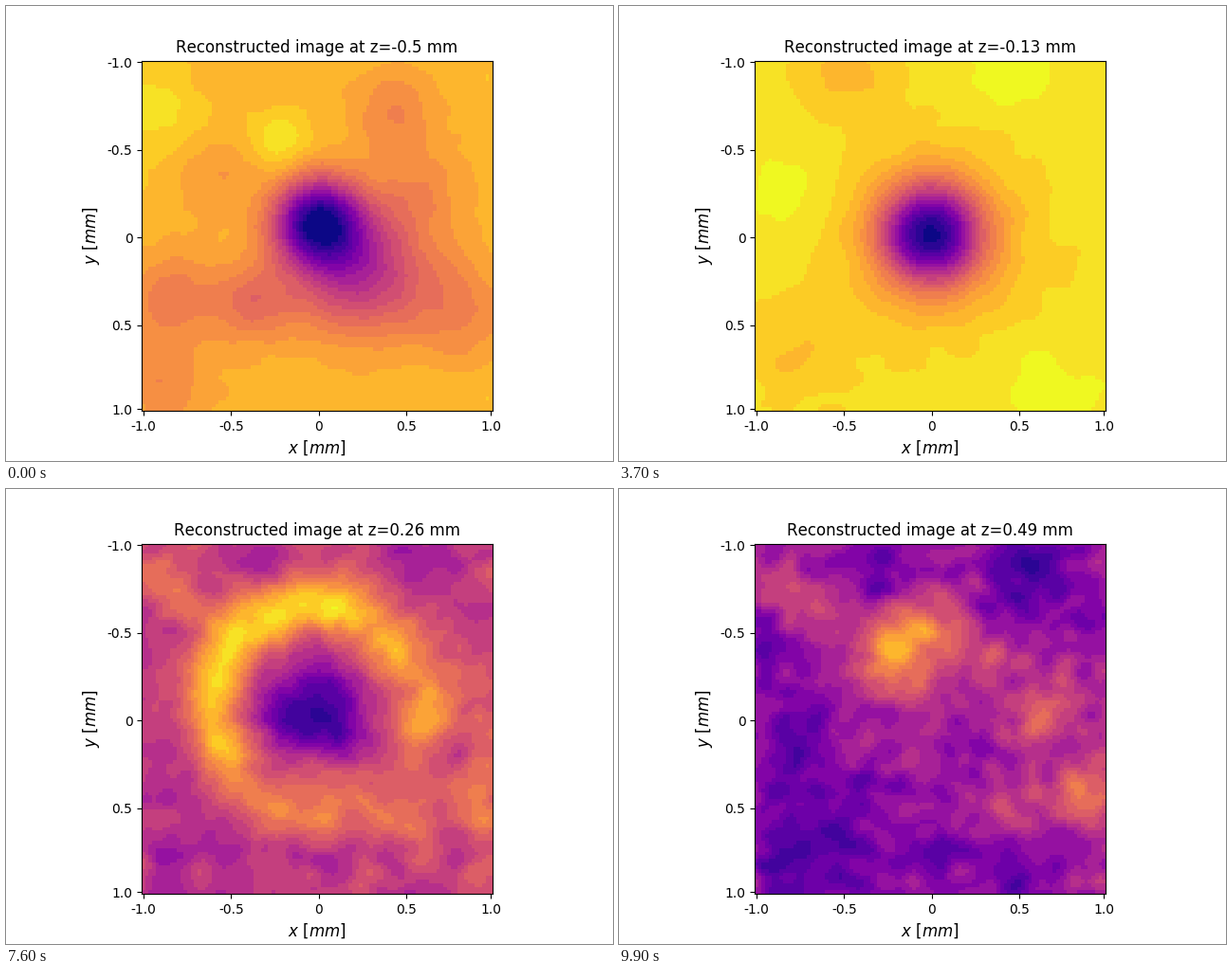
These frames come from a looping animation (640x480 px, 10000 ms). A matplotlib script:

```python
import numpy as np
import matplotlib.pyplot as plt
from matplotlib.animation import FuncAnimation

N = 100
FRAMES = 100

axis = (np.arange(N) - N / 2) / (N / 2)
X, Y = np.meshgrid(axis, axis)

# Seeded speckle, carried along z by a Fresnel phase
rng = np.random.default_rng(7)
freq = np.fft.fftfreq(N)
K2 = freq[:, None] ** 2 + freq ** 2
SPECTRUM = np.fft.fft2(rng.normal(size=(N, N))) * np.exp(-K2 / (2 * .075 ** 2))

# Uneven background as (x, y, size, strength), grouped by depth
EARLY = [(-.85, .32, .19, -.16), (-.38, .38, .17, -.19), (.80, .42, .22, -.14),
         (.42, -.72, .18, -.13), (.60, -.28, .20, -.10), (-.60, -.35, .17, -.09),
         (-.22, -.55, .11, .11), (-.95, -.70, .20, .08), (-.90, .85, .22, -.12)]
MIDDLE = [(.45, -.92, .20, .06), (-.82, -.25, .20, .05), (.65, .85, .22, .05),
          (-.48, -.92, .19, -.08), (-.75, .65, .20, -.07)]
LATE = [(.92, .46, .15, .40), (.70, -.06, .20, .22), (.48, .46, .13, .24),
        (-.75, -.75, .20, .18), (.60, -.88, .19, -.24), (-.86, .13, .15, -.26),
        (-.52, .62, .17, -.20), (-.80, .88, .20, -.22), (.57, .88, .16, -.22),
        (.03, .78, .11, -.24), (-.35, -.80, .10, -.18), (-1, -.42, .13, -.18)]


def gauss(d, width):
    return np.exp(-(d / width) ** 2 / 2)


def spot(x, y, size):
    return gauss(np.hypot(X - x, Y - y), size)


def ramp(z, start, end):
    t = np.clip((z - start) / (end - start), 0, 1)
    return t * t * (3 - 2 * t)


def patches(group, z, z0, span):
    """Spots that swell around depth z0 and shrink towards the axis."""
    scale = 1 - .5 * (z - z0)
    return gauss(z - z0, span) * sum(
        a * spot(x * scale, y * scale, s) for x, y, s, a in group)


def core(z):
    """Dark absorber, off-centre and lopsided at the near end."""
    tilt = ramp(-z, .2, .5)
    depth = .70 - .70 * ramp(z, .1, .48)
    halo = .20 + .22 * tilt - .20 * ramp(z, .05, .25)
    return (depth * spot(-.01, -.02 - .07 * tilt, .19 - .02 * tilt)
            + halo * spot(.03 + .19 * tilt, .17 * tilt, .33 - .06 * tilt))


def ring(z):
    """Bright fringe, strongest at upper left, that closes into a disc."""
    knots = [0, .26, .35, .49]
    radius = np.interp(z, knots, [.78, .59, .46, .08])
    cy = np.interp(z, knots, [-.05, -.08, -.12, -.32])
    cx = -.08 * ramp(z, .2, .4)
    dx, dy = X - cx, Y - cy
    r = np.hypot(dx, dy)
    side = (-dx - dy) / np.sqrt(2) / np.maximum(r, .25)
    width = .11 + .07 * ramp(z, .35, .49)
    return .56 * ramp(z, -.05, .4) * gauss(r - radius, width) * (.6 + .4 * side)


def speckle(z):
    s = np.fft.ifft2(SPECTRUM * np.exp(600j * z * K2)).real
    return (.006 + .040 * ramp(z, 0, .35)) * s / s.std()


def field(z):
    base = .92 - .08 * ramp(-z, .2, .5) - .58 * ramp(z, 0, .4)
    f = base - core(z) + ring(z) + speckle(z)
    f += patches(EARLY, z, -.5, .13)
    f += patches(MIDDLE, z, -.1, .17)
    f += patches(LATE, z, .4, .11)
    f += .28 * gauss(z - .34, .07) * spot(.04, .33, .13)
    return np.clip(f, 0, 1)


plt.rcParams["text.kerning_factor"] = 6
fig, ax = plt.subplots(figsize=(6.4, 4.8), dpi=100)
image = ax.imshow(field(-.5), cmap=plt.get_cmap("plasma", 20), vmin=0, vmax=1)
title = ax.set_title("")
ticks, labels = [0, 25, 50, 75, 99], ["-1.0", "-0.5", "0", "0.5", "1.0"]
ax.set_xticks(ticks, labels)
ax.set_yticks(ticks, labels)
ax.set_xlabel("$x$ $[mm]$", fontsize=12)
ax.set_ylabel("$y$ $[mm]$", fontsize=12)


def update(i):
    z = (i - 50) / 100
    image.set_data(field(z))
    title.set_text(f"Reconstructed image at z={z} mm")
    return image, title


anim = FuncAnimation(fig, update, frames=FRAMES, interval=100, repeat=True,
                     repeat_delay=0)
plt.show()
```
